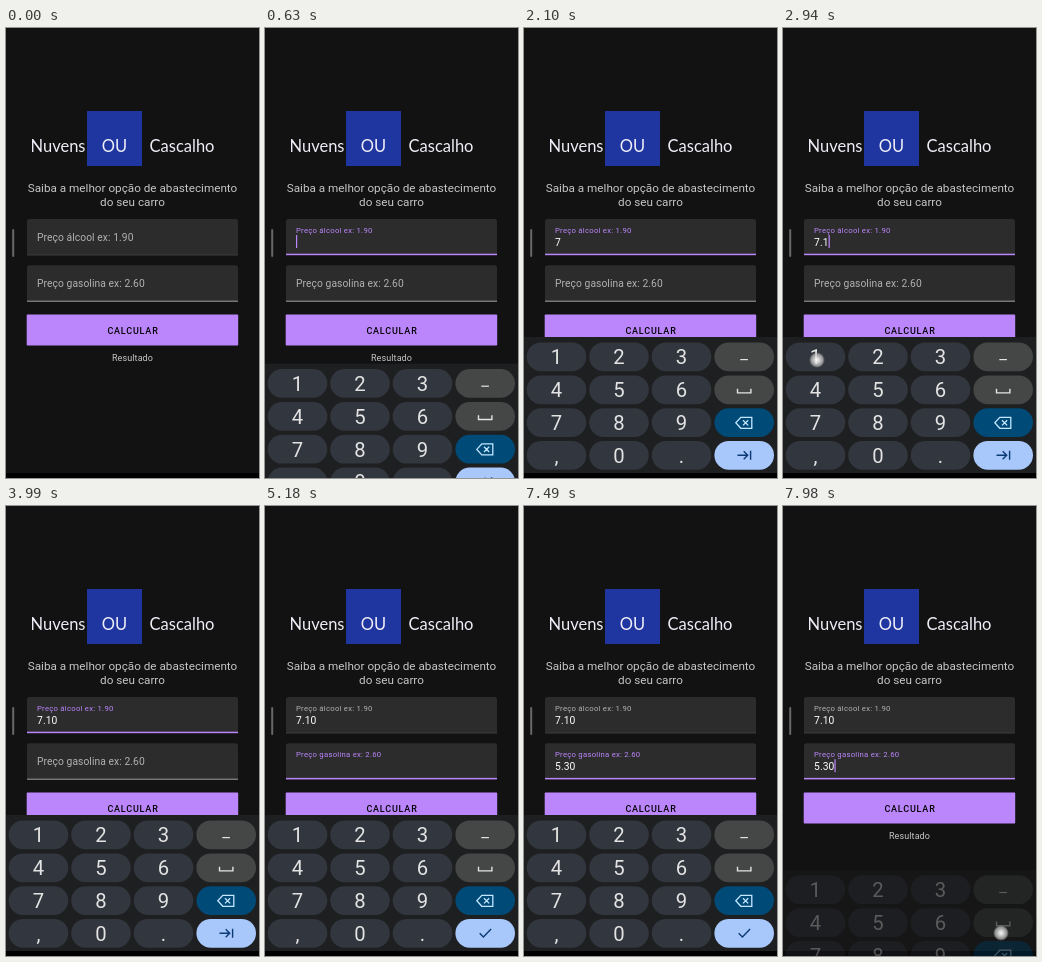
Recreate the animation shown at these times as an HTML page. Size 253 px wide and 450 px high, loop 8 s.

```html
<!DOCTYPE html>
<html lang="pt">
<head>
<meta charset="utf-8">
<title>Comparador de combustível</title>
<style>
  html, body { margin: 0; width: 100%; height: 100%; overflow: hidden; background: #121212; }
  svg { display: block; width: 100%; height: 100%; font-family: Roboto, sans-serif; }
</style>
</head>
<body>
<svg id="stage" viewBox="0 0 253 450"></svg>
<script>
const LOOP = 8000;
const PURPLE = '#bb86fc', GREY = '#b2b2b2', LIGHT = '#c6c6c6';
const stage = document.getElementById('stage');

function add(parent, tag, attrs, text) {
  const node = document.createElementNS('http://www.w3.org/2000/svg', tag);
  set(node, attrs);
  if (text !== undefined) node.textContent = text;
  parent.appendChild(node);
  return node;
}
function set(node, attrs) {
  for (const name in attrs) node.setAttribute(name, attrs[name]);
}
const rect = (parent, x, y, width, height, fill, rx = 0) =>
  add(parent, 'rect', { x, y, width, height, fill, rx });
const label = (parent, text, x, y, size, fill, extra = {}) =>
  add(parent, 'text', { x, y, 'font-size': size, fill, ...extra }, text);
const centred = { 'text-anchor': 'middle' };
const clamp = v => Math.max(0, Math.min(1, v));
const progress = (t, start, length) => clamp((t - start) / length);

// Page
rect(stage, 0, 0, 253, 450, '#121212');
rect(stage, 0, 445, 253, 5, '#000');
rect(stage, 81, 83, 55, 55, '#1f35a0');
[['Nuvens', 52], ['OU', 108.5], ['Cascalho', 176]].forEach(([word, x]) =>
  label(stage, word, x, 124, 16.5, '#eeeef8', { ...centred, 'font-family': 'Lato, sans-serif' }));
label(stage, 'Saiba a melhor opção de abastecimento', 126.5, 164.2, 11.72, LIGHT, centred);
label(stage, 'do seu carro', 126.5, 178, 11.72, LIGHT, centred);
rect(stage, 6.2, 201, 2, 28, '#686868', 1);

function makeField(top, hint, restLine) {
  add(stage, 'path', { d: `M21 ${top + 36}v-33.5q0-2.5 2.5-2.5h206q2.5 0 2.5 2.5v33.5z`, fill: '#2c2c2c' });
  return {
    top, restLine,
    line: rect(stage, 21, top + 35.5, 211, 1, restLine),
    hint: label(stage, hint, 31, top + 21.7, 10.29, GREY),
    value: label(stage, '', 31, top + 27, 10.29, '#fff', { 'letter-spacing': 0.1 }),
    caret: rect(stage, 31, top + 16, 1.2, 13, PURPLE)
  };
}
const fields = [
  makeField(191, 'Preço álcool ex: 1.90', '#3c3c3c'),
  makeField(237.2, 'Preço gasolina ex: 2.60', '#a0a0a0')
];

rect(stage, 20.7, 286.6, 211.5, 31, PURPLE, 0.8);
label(stage, 'CALCULAR', 127, 305.6, 9, '#000', { ...centred, 'font-weight': 500, 'letter-spacing': 0.8 });
label(stage, 'Resultado', 126.5, 332.7, 9, LIGHT, { ...centred, 'letter-spacing': 0.1 });

// Keyboard
const COLS = [32.5, 95, 157.5, 220.2], ROWS = [328.8, 361.8, 394.6, 427.3];
const keyboard = add(stage, 'g', {});
rect(keyboard, 0, 309, 253, 141, '#1e1f20');
rect(keyboard, 0, 445, 253, 150, '#000');
['123', '456', '789', ',0.'].forEach((row, r) => {
  [...row].forEach((char, c) => {
    rect(keyboard, COLS[c] - 29.8, ROWS[r] - 14.4, 59.6, 28.8, '#32363e', 14.4);
    label(keyboard, char, COLS[c], ROWS[r] + 7.5, 20.3, '#e3e3e3', centred);
  });
  rect(keyboard, COLS[3] - 29.8, ROWS[r] - 14.4, 59.6, 28.8,
    ['#444746', '#444746', '#004a77', '#a8c7fa'][r], 14.4);
});
const icon = (d, stroke, width = 1.4) =>
  add(keyboard, 'path', { d, stroke, fill: 'none', 'stroke-width': width });
icon('M216.3 331.6h7.6', '#e3e3e3', 1.2);
icon('M213.5 360.7v4.2h13.4v-4.2', '#e3e3e3');
icon('M216.8 389.3h11v11h-11l-5-5.5zM219 392.2l5.2 5.2m0-5.2l-5.2 5.2', '#c2e7ff', 1.3);
const nextIcon = icon('M213.5 427.2h10.2m-4-4l4 4l-4 4M226.6 422.7v9', '#0b3a75');
const doneIcon = icon('M214.7 427.2l3.7 3.7l7.7-8', '#0b3a75');

// Touch indicator
const glow = add(add(stage, 'defs', {}), 'radialGradient', { id: 'glow' });
[[0, '#fff', 0.95], [0.3, '#e4e4e4', 0.9], [0.75, '#bbb', 0.7], [1, '#888', 0]].forEach(([offset, color, opacity]) =>
  add(glow, 'stop', { offset, 'stop-color': color, 'stop-opacity': opacity }));
const dot = add(stage, 'circle', { r: 8, fill: 'url(#glow)' });

// Each tap: time, x, y, field with focus, text after the tap
const CLOSE = 7910;
const taps = [
  [340, 58, 211, 0, ''],
  [1500, 33, 396, 0, '7'],
  [2450, 152, 433, 0, '7.'],
  [2920, 34, 332, 0, '7.1'],
  [3420, 96, 431, 0, '7.10'],
  [4660, 219, 430, 1, ''],
  [5560, 96, 364, 1, '5'],
  [6240, 152, 434, 1, '5.'],
  [6600, 158, 332, 1, '5.3'],
  [6930, 96, 431, 1, '5.30'],
  [CLOSE, 218, 427, 1, '5.30']
];
const textWidth = s => [...s].reduce((w, c) => w + (c === '.' ? 2.8 : 5.88), 0);

function drawField(field, index, t, focus, text, blinkStart) {
  const float = progress(t, index ? 4660 : 340, 167);
  const focused = focus === index;
  set(field.hint, {
    y: field.top + 21.7 - 7.8 * float,
    'font-size': 10.29 - 2.57 * float,
    'letter-spacing': 0.07 + 0.18 * float,
    fill: focused ? PURPLE : GREY
  });
  set(field.line, {
    y: field.top + (focused ? 34.7 : 35.5),
    height: focused ? 1.5 : 1,
    fill: focused ? PURPLE : field.restLine
  });
  if (field.value.textContent !== text) field.value.textContent = text;
  set(field.caret, {
    x: 31 + textWidth(text),
    opacity: focused && (t - blinkStart) % 1000 < 500 ? 1 : 0
  });
}

function draw(t) {
  const values = ['', ''];
  let focus = -1, blinkStart = 0, dotAlpha = 0;
  for (const [time, x, y, field, text] of taps) {
    if (t >= time) {
      focus = field;
      values[field] = text;
      // The last tap only closes the keyboard
      if (time < CLOSE) blinkStart = time;
    }
    const alpha = Math.min(progress(t, time - 110, 40), 1 - progress(t, time + 80, 60));
    if (alpha > 0) {
      dotAlpha = alpha;
      set(dot, { cx: x, cy: y });
    }
  }
  set(dot, { opacity: dotAlpha });
  fields.forEach((field, i) => drawField(field, i, t, focus, values[i], blinkStart));

  const show = progress(t, 490, 280), hide = progress(t, 7850, 200);
  const offset = 108 * (1 - show) ** 2 + 128 * hide ** 2;
  set(keyboard, {
    transform: `translate(0 ${offset})`,
    opacity: Math.min(1, show * 2) * (1 - hide)
  });
  set(nextIcon, { opacity: focus === 1 ? 0 : 1 });
  set(doneIcon, { opacity: focus === 1 ? 1 : 0 });
}

const start = performance.now();
function tick() {
  draw((performance.now() - start) % LOOP);
  requestAnimationFrame(tick);
}
tick();
</script>
</body>
</html>
```
